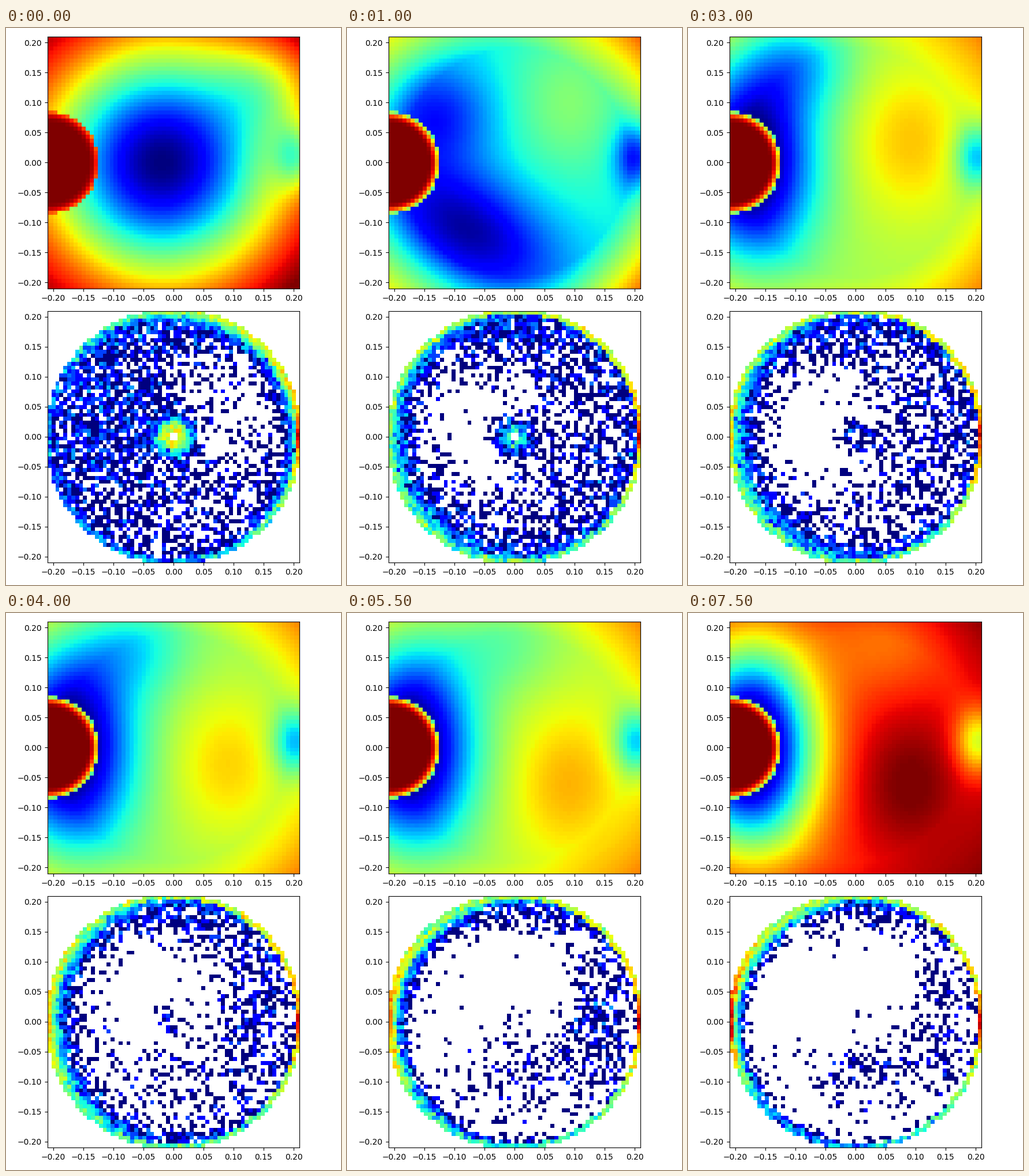
Recreate the animation shown at these times as a matplotlib script. Size 580 px wide and 966 px high, loop 8 s.

```python
import numpy as np
import matplotlib.pyplot as plt
from matplotlib.animation import FuncAnimation

W, H, DPI = 580, 966, 100
FRAMES, STEP = 16, 500
R, N = 0.21, 64
LOG_MAX = 5.8                # log of the fullest cell's count
TIMES = (0, 2, 6, 10, 15)    # key steps of the gas


def bell(x, y, cx, cy, sx, sy, tilt=0):
    c, s = np.cos(np.radians(tilt)), np.sin(np.radians(tilt))
    dx, dy = x - cx, y - cy
    u, v = dx * c + dy * s, dy * c - dx * s
    return np.exp(-0.5 * ((u / sx) ** 2 + (v / sy) ** 2))


def ramp(step, start, end):
    return np.clip((step - start) / (end - start), 0, 1)


def mix(a, b, t):
    return a + (b - a) * t


def track(step, *values):
    return np.interp(step, TIMES, values)


# Potential, sampled on nodes
nodes = np.linspace(-R, R, N)
X, Y = np.meshgrid(nodes, nodes)
corner = np.clip((np.hypot(X, Y) - 0.19) / 0.11, 0, 1) * (1 + X)
right_well = bell(X, Y, 0.205, 0.01, 0.027, 0.038)
trough = bell(X, Y, -0.18, 0, 0.075, 0.115)
disc_r = np.hypot(X + R, Y)


def potential(step):
    base = np.interp(step, [0, 2, 4, 6, 10, 13, 15],
                     [0.97, 0.37, 0.29, 0.56, 0.53, 0.68, 0.87])
    v = base + max(0.74 - base, 0.1) * corner - 0.3 * right_well
    v = v - 1.17 * base * ramp(step, 4, 6) * trough

    # The central bowl slides down left, flattens and fades
    t = ramp(step, 0, 2)
    depth = np.interp(step, [0, 2, 4, 6], [0.97, 0.34, 0.25, 0])
    v = v - depth * bell(X, Y, mix(-0.02, -0.08, t), -0.11 * t,
                         mix(0.131, 0.115, t), mix(0.131, 0.065, t), -32 * t)

    # A warm patch sinks on the right
    warm_y = mix(0.1, -0.06, ramp(step, 4, 9))
    v = v + 0.14 * t * bell(X, Y, 0.09, warm_y, 0.07, 0.09)

    # A cool patch tours the upper half
    cool_x = np.interp(step, [0, 2, 4, 15], [0.16, -0.13, -0.13, 0.05])
    cool_y = np.interp(step, [0, 2, 4, 6], [0.13, 0.08, 0.08, 0.17])
    cool = mix(0.22, 0.08, ramp(step, 5, 12))
    v = v - cool * bell(X, Y, cool_x, cool_y, 0.065, 0.06)

    drop = mix(0.22, 0.55, t)
    disc = 1 - drop * np.clip((disc_r - 0.065) / 0.02, 0, 1) ** 2.5
    return np.where(disc_r < 0.0852, disc, np.clip(v, 0, 1))


# Particle counts, on cells
cell = 2 * R / N
mids = (np.arange(N) + 0.5) * cell - R
PX, PY = np.meshgrid(mids, mids)
rad = np.hypot(PX, PY)
angle = np.degrees(np.arctan2(PY, PX))
near = np.hypot(abs(PX) - cell / 2, abs(PY) - cell / 2)
far = np.hypot(abs(PX) + cell / 2, abs(PY) + cell / 2)
inside = near < R - 1e-9
on_rim = inside & (far >= R)
core = (abs(PX) < cell) & (abs(PY) < cell)


def thin_gas(step):
    lam = track(step, 0.6, 0.55, 0.38, 0.05, 0)
    lam = lam + 1.1 * (1 - ramp(step, 0, 2)) * bell(PX, PY, -0.14, 0.04, 0.09, 0.12)
    lam = lam + track(step, 0, 0.4, 0.5, 1.1, 0.6) * bell(PX, PY, 0.14, 0.01, 0.035, 0.08)
    lam = lam + 0.6 * ramp(step, 6, 12) * bell(PX, PY, 0.02, -0.085, 0.07, 0.035)
    lam = lam + 0.8 * bell(PX, PY, 0.02, 0.175, 0.09, 0.028)
    void_x = track(step, 0.08, -0.07, -0.07, 0, 0)
    void_y = track(step, 0.04, 0.02, 0.01, 0.06, 0.07)
    dist = np.hypot(PX - void_x, PY - void_y)
    return lam * (1 - track(step, 0.7, 0.95, 0.97, 0.95, 0.9) * np.exp(-(dist / 0.1) ** 4))


def wall_layer(step):
    heading = track(step, 40, 200, 195, 160, 155)
    swing = track(step, 0.3, 0.19, 0.22, 0.42, 0.42)
    thick = track(step, 0.007, 0.013, 0.013, 0.007, 0.006)
    level = 0.23 + swing * np.cos(np.radians(angle - heading))
    return np.exp(LOG_MAX * level - np.clip(R - 0.005 - rad, 0, None) / thick)


def rim_count(step):
    left = np.interp(step, [0, 2, 15], [0.2, 0.5, 0.92])
    low = track(step, 0.25, 0.48, 0.46, 0.42, 0.24)
    levels = [0.72, 0.6, 0.55, min(left + 0.15, 0.53), left, low, low, 0.45]
    level = np.interp(angle, np.arange(0, 360, 45), levels, period=360)
    return np.exp(LOG_MAX * (level + 0.2 * np.exp(-(angle / 7) ** 2)))


def particles(step):
    spot = np.expm1(LOG_MAX * 0.64 * np.exp(-step / 4))
    hot = spot * np.exp(-np.clip(rad - 0.016, 0, None) / 0.007)
    lam = np.where(on_rim, rim_count(step), thin_gas(step) + wall_layer(step) + hot)
    rng = np.random.default_rng(100 + step)
    lam = np.where(inside & ~core, lam, 0) * np.exp(rng.normal(0, 0.25, (N, N)))
    n = rng.poisson(lam)
    return np.ma.masked_where(n == 0, np.log(np.maximum(n, 1)) / LOG_MAX)


def show(ax, data, half):
    image = ax.imshow(data, cmap="jet", vmin=0, vmax=1, origin="lower",
                      extent=[-half, half, -half, half], interpolation="nearest")
    ax.set(xlim=(-R, R), ylim=(-R, R))
    return image


fig, (top, low) = plt.subplots(2, 1, figsize=(W / DPI, H / DPI), dpi=DPI)
field = show(top, potential(0), R + R / (N - 1))
counts = show(low, particles(0), R)
fig.tight_layout()


def update(step):
    field.set_data(potential(step))
    counts.set_data(particles(step))
    return field, counts


anim = FuncAnimation(fig, update, frames=FRAMES, interval=STEP,
                     repeat=True, repeat_delay=0, blit=False)
plt.show()
```
